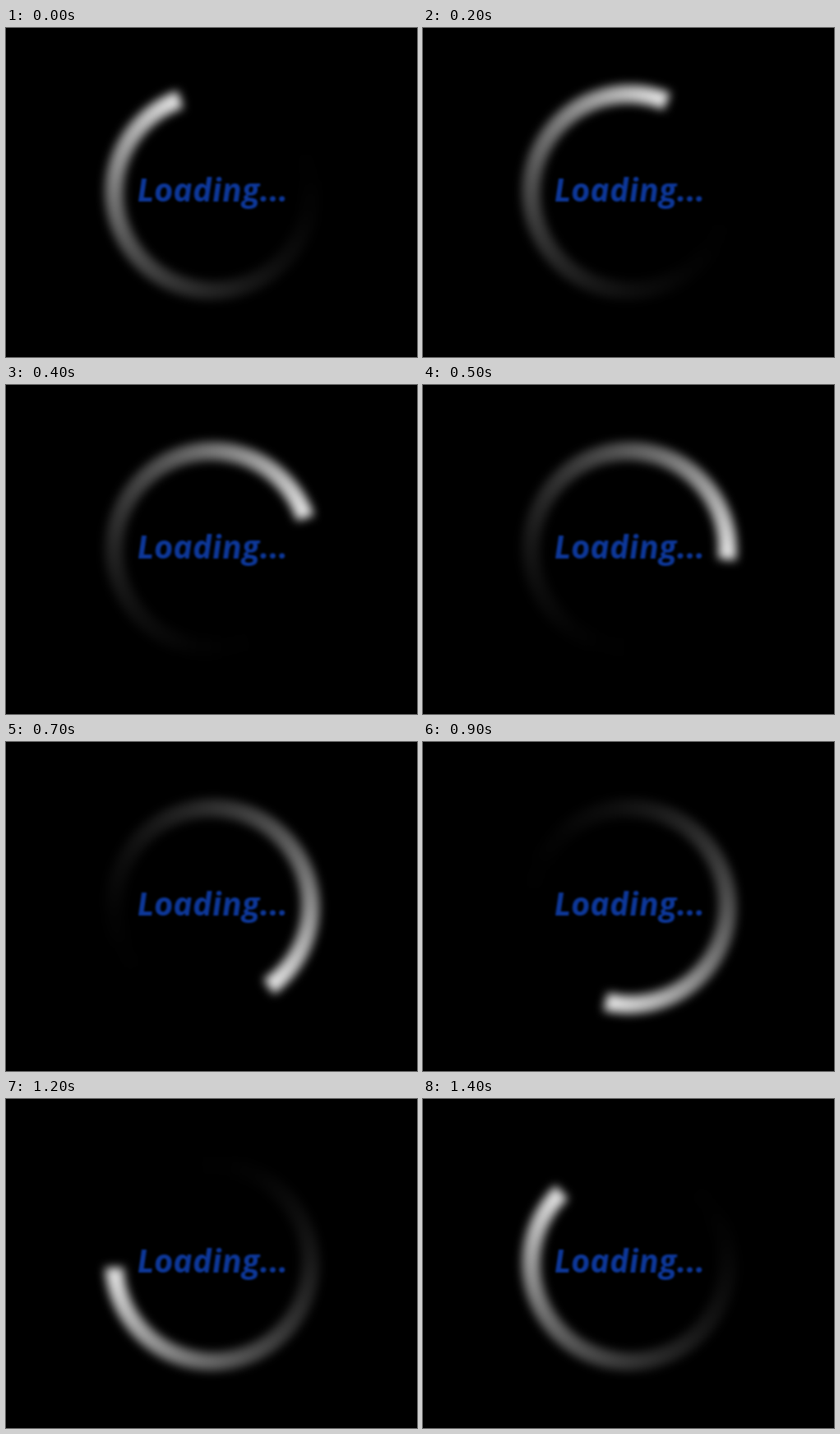
Animation, 500 px wide and 400 px high, one loop 1.5 s. Source, as an HTML page with a canvas:

```html
<!DOCTYPE html>
<html lang="en">
<head>
<meta charset="utf-8">
<title>Loading</title>
<style>
  html, body { margin: 0; width: 100%; height: 100%; overflow: hidden; background: #000; }
  canvas, svg { position: absolute; left: 0; top: 0; }
  text {
    font: italic 700 40px "Open Sans", "Noto Sans", sans-serif;
    fill: #0d3798;
    filter: blur(.8px);
  }
</style>
</head>
<body>
<canvas width="500" height="400"></canvas>
<svg width="500" height="400"><text transform="translate(160 211) skewX(4)">Loading...</text></svg>
<script>
  const STEPS = 15, STEP_MS = 100, STEP_DEG = 24.5, START_DEG = -2;
  const TAIL_DEG = 290, FADE_POWER = 2.3;
  const CX = 251, CY = 199.7, RADIUS = 119.5;
  const ctx = document.querySelector('canvas').getContext('2d');
  ctx.lineWidth = 22;
  ctx.filter = 'blur(6px)';

  // Angles run clockwise from the top; the tail fades out behind the head.
  function drawRing(headDeg) {
    const gradient = ctx.createConicGradient((headDeg - 90) * Math.PI / 180, CX, CY);
    for (let deg = 0; deg <= 360; deg += 10) {
      const fade = Math.max(0, 1 - (360 - deg) / TAIL_DEG) ** FADE_POWER;
      gradient.addColorStop(deg / 360, `rgba(232, 232, 232, ${fade.toFixed(4)})`);
    }
    ctx.clearRect(0, 0, 500, 400);
    ctx.strokeStyle = gradient;
    ctx.beginPath();
    ctx.arc(CX, CY, RADIUS, 0, 2 * Math.PI);
    ctx.stroke();
  }

  const start = performance.now();
  function frame() {
    const step = Math.floor((performance.now() - start) / STEP_MS);
    // The sweep restarts one step into the loop.
    drawRing(START_DEG + STEP_DEG * ((step + STEPS - 1) % STEPS));
    requestAnimationFrame(frame);
  }
  frame();
</script>
</body>
</html>
```
